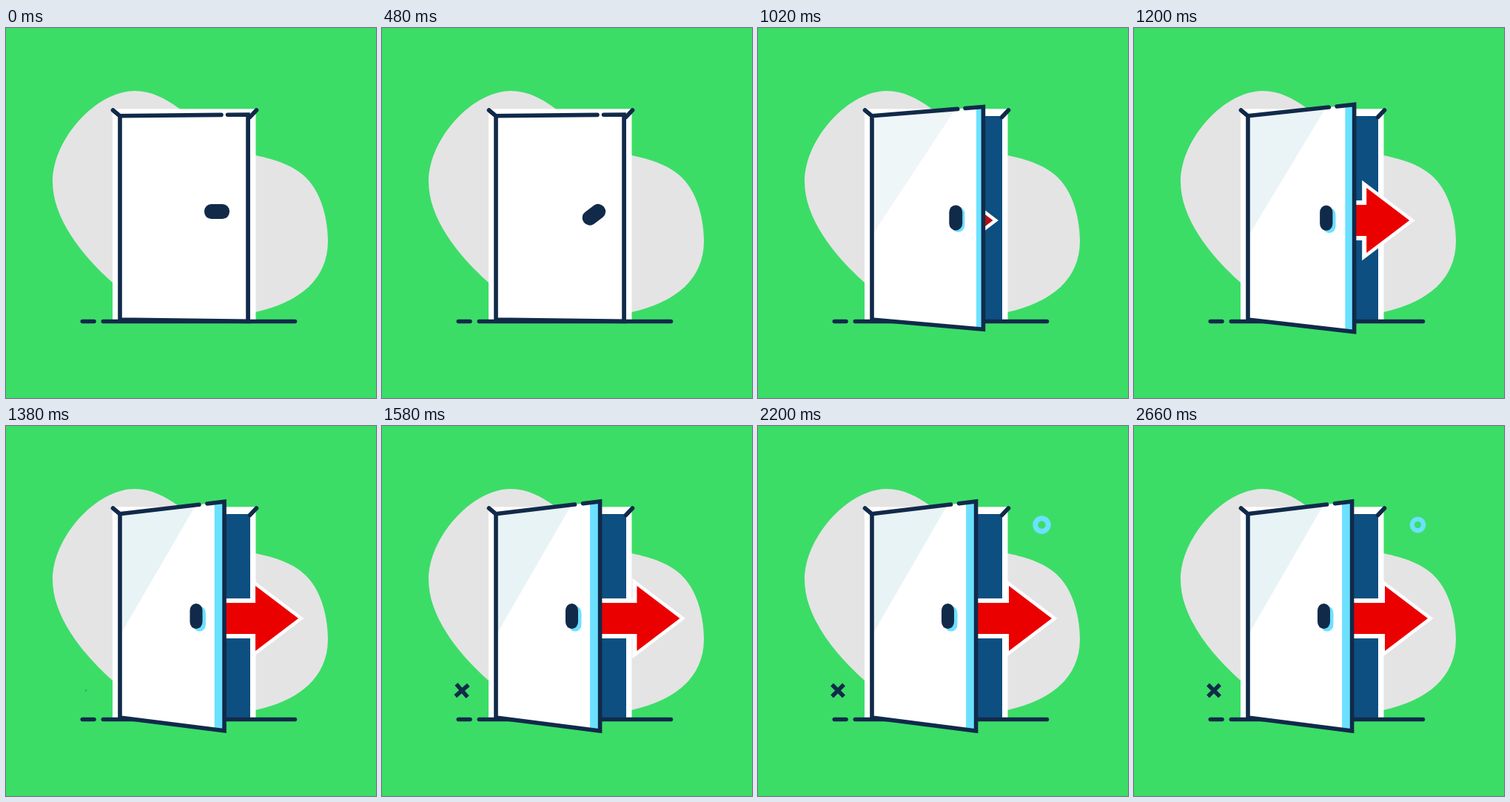
These frames come from a looping animation (500 px wide and 500 px high, 3.04 s). An HTML page:

```html
<!DOCTYPE html>
<html lang="en">
<head>
<meta charset="utf-8">
<title>Door exit</title>
<style>
  html, body { margin: 0; width: 100%; height: 100%; overflow: hidden; background: #3bdd67; }
  svg { display: block; width: 100%; height: 100%; }
  .line { fill: none; stroke: #112a4a; stroke-width: 5.6; stroke-linecap: round; stroke-miterlimit: 10; }
</style>
</head>
<body>
<svg viewBox="0 0 500 500">
  <defs>
    <clipPath id="doorway"><rect x="200" y="100" width="300" height="300"/></clipPath>
    <rect id="grip" x="-24" y="-10" width="34" height="20" rx="9.5"/>
  </defs>
  <rect width="500" height="500" fill="#3bdd67"/>
  <path fill="#e4e4e4" d="M174 85C196 85 215 95 233 108C265 132 300 165 337 172C365 178 391 186 408 205
    C428 227 435 262 435 288C435 340 396 371 337 384C260 396 180 380 144 344C100 305 63 255 63 208C63 150 122 85 174 85Z"/>
  <rect x="144" y="109.3" width="193.5" height="287" fill="#fff"/>
  <rect x="154" y="119" width="176" height="276" fill="#0d4f80"/>
  <path class="line" d="M103.3 396.5H119M131.3 396.5H390.5"/>
  <g clip-path="url(#doorway)">
    <g id="arrow">
      <path fill="#fff" d="M7.5 0L-64 -54.3V-27H-160V27H-64V54.3Z"/>
      <path id="core" d="M0 0L-58 -44V-21H-160V21H-58V44Z"/>
    </g>
  </g>
  <path class="line" d="M338.5 111L329.5 120.5"/>
  <path id="panel" fill="#fff"/>
  <path id="glare" fill="#e8f3f5"/>
  <path id="side" fill="#6be1ff"/>
  <path id="edge" class="line"/>
  <path class="line" d="M144.5 111L154 119"/>
  <use id="shade" href="#grip" fill="#6be1ff"/>
  <use id="handle" href="#grip" fill="#112a4a"/>
  <circle id="ring" r="7.7" fill="none" stroke="#6be1ff" stroke-width="6.2"/>
  <path id="cross" fill="none" stroke="#112a4a" stroke-width="5.4" d="M-8 -8L8 8M-8 8L8 -8"/>
</svg>
<script>
const LOOP = 3040;
const el = Object.fromEntries([...document.querySelectorAll('svg [id]')].map(n => [n.id, n]));
const set = (id, name, value) => el[id].setAttribute(name, value);
const lerp = (a, b, p) => a + (b - a) * p;
const span = (t, a, b) => Math.min(1, Math.max(0, (t - a) / (b - a)));
const smooth = x => x * x * (3 - 2 * x);

// Cubic bezier (.33, 0, .2, 1), solved by bisection
function swift(x) {
  let lo = 0, hi = 1;
  for (let i = 0; i < 24; i++) {
    const s = (lo + hi) / 2, r = 1 - s;
    if (3 * r * r * s * 0.33 + 3 * r * s * s * 0.2 + s * s * s < x) lo = s; else hi = s;
  }
  return x <= 0 ? 0 : x >= 1 ? 1 : smooth(lo);
}

// Travel from a past the goal to peak, then settle on the goal
function settle(t, start, top, end, a, peak, goal) {
  return t < top
    ? lerp(a, peak, swift(span(t, start, top)))
    : lerp(peak, goal, smooth(span(t, top, end)));
}

function drawDoor(p) {
  const x = lerp(327, 294.6, p), top = lerp(117, 102, p), low = lerp(396.3, 412, p);
  const yTop = at => lerp(118.8, top, (at - 154) / (x - 154));
  const yLow = at => lerp(394, low, (at - 154) / (x - 154));
  const face = x - 13.5 * p, shine = lerp(291.5, 256, p);
  const end = lerp(291, 260.5, p), begin = lerp(299.5, 271.5, p);
  set('panel', 'd', `M154 118.8L${x} ${top}V${low}L154 394Z`);
  set('glare', 'd', `M154 118.8L${shine} ${yTop(shine)}L154 ${lerp(274, 283, p)}Z`);
  set('glare', 'opacity', p);
  set('side', 'd', `M${face} ${yTop(face)}L${x} ${top}V${low}L${face} ${yLow(face)}Z`);
  set('edge', 'd', `M${begin} ${yTop(begin)}L${x} ${top}V${low}L154 394V118.8L${end} ${yTop(end)}`);
}

function drawHandle(t, p) {
  const x = lerp(292, 256.5, p), y = lerp(248, 250, p);
  const turn = -90 * smooth(span(t, 100, 960));
  const place = (dx, dy) => `translate(${x + dx} ${y + dy}) scale(${lerp(1, 0.85, p)} 1) rotate(${turn})`;
  set('handle', 'transform', place(0, 0));
  set('shade', 'transform', place(4.5 * p, 3.5 * p));
  set('shade', 'visibility', p > 0 ? 'visible' : 'hidden');
}

function draw(t) {
  const open = swift(span(t, 655, 1511));
  drawDoor(open);
  drawHandle(t, open);

  const tip = settle(t, 700, 1600, 2140, 204, 402.5, 397);
  const glow = span(t, 1030, 1100);
  set('arrow', 'transform', `translate(${tip} 260)`);
  set('arrow', 'visibility', t > 700 ? 'visible' : 'hidden');
  set('core', 'fill', `rgb(${lerp(182, 235, glow)},${lerp(12, 0, glow)},${lerp(18, 0, glow)})`);

  const size = settle(t, 1320, 1780, 2190, 0, 1.2, 1);
  const spin = settle(t, 1320, 1780, 2190, -90, 20, 0);
  set('cross', 'transform', `translate(108 357.5) rotate(${spin}) scale(${size})`);
  set('cross', 'visibility', size > 0 ? 'visible' : 'hidden');

  const grow = settle(t, 1600, 2160, 2660, 0, 1.14, 1);
  set('ring', 'transform', `translate(383.5 133.6) scale(${grow})`);
  set('ring', 'visibility', grow > 0 ? 'visible' : 'hidden');
}

const t0 = performance.now();
function tick() {
  draw((performance.now() - t0) % LOOP);
  requestAnimationFrame(tick);
}
tick();
</script>
</body>
</html>
```
